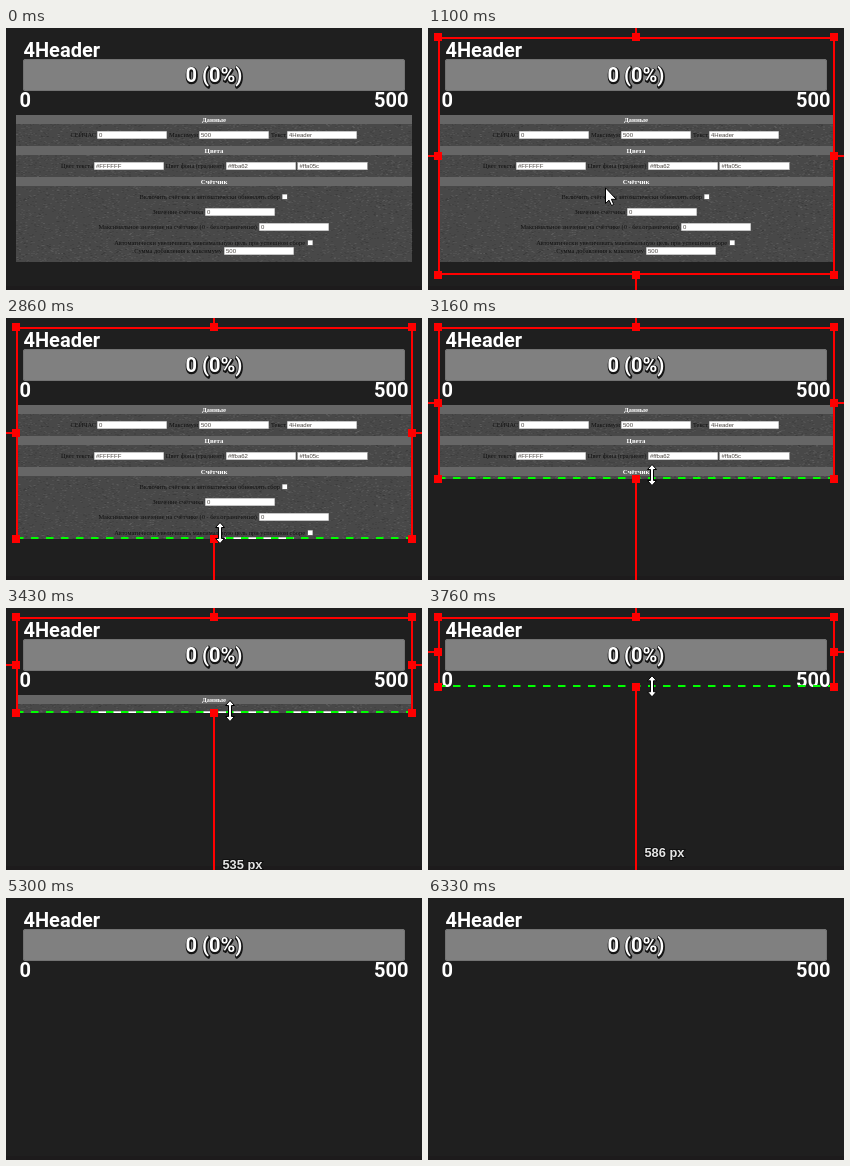
These frames come from a looping animation (416x262 px, 6590 ms). An HTML page with a canvas:

```html
<!DOCTYPE html>
<html lang="ru">
<head>
<meta charset="utf-8">
<style>
html, body { margin: 0; width: 100%; height: 100%; overflow: hidden; background: #1f1f1f; }
canvas { display: block; width: 416px; height: 262px; }
</style>
</head>
<body>
<canvas id="stage" width="416" height="262"></canvas>
<script>
const W = 416, H = 262, LOOP = 6590;
const LEFT = 10, RIGHT = 407, TOP = 9, BOTTOM = 247, MID = 208;
const BG = '#1f1f1f', RED = '#ff0000', GREEN = '#00ff00', HOVER = '#007fff';
const SERIF = '"Liberation Serif", serif';
const SANS = '"Liberation Sans", sans-serif';
const ROBOTO = 'Roboto, sans-serif';
const ctx = document.getElementById('stage').getContext('2d');

// Keys are [time, ...values]; values are interpolated linearly.
function track(keys, t) {
  if (t <= keys[0][0]) return keys[0].slice(1);
  for (let i = 1; i < keys.length; i++) {
    const a = keys[i - 1], b = keys[i];
    if (t <= b[0]) {
      const k = (t - a[0]) / (b[0] - a[0]);
      return a.slice(1).map((v, j) => v + (b[j + 1] - v) * k);
    }
  }
  return keys[keys.length - 1].slice(1);
}

const edgeKeys = [[2760, 246], [2860, 221.5], [3160, 161], [3430, 105],
  [3600, 86], [3750, 79], [4060, 83], [4200, 84]];
const enterKeys = [[200, 2, 205], [380, 62, 190], [560, 140, 167], [730, 177, 159]];
const descendKeys = [[1260, 177, 159], [1500, 192, 184], [1760, 214, 228], [1900, 218, 238]];
const hoverKeys = [[1930, 215, 248], [2260, 214, 242]];
// Horizontal place and offset from the dragged edge.
const dragKeys = [[2760, 214, -5], [2860, 214, -6], [3160, 224, -4], [3430, 224, -2], [4200, 224, 1]];
const leaveKeys = [[4670, 224, 84], [4860, 45, 115]];

function text(c, str, x, y, font, color, align = 'left') {
  c.font = font;
  c.fillStyle = color;
  c.textAlign = align;
  c.fillText(str, x, y);
}

function box(c, x, y, w, h, color) {
  c.fillStyle = color;
  c.fillRect(x, y, w, h);
}

function label(c, str, right, y) {
  text(c, str, right, y, '6.4px ' + SERIF, '#101010', 'right');
}

function input(c, x, y, value) {
  box(c, x, y, 70, 8, '#ffffff');
  c.strokeStyle = '#8a8a8a';
  c.lineWidth = 0.5;
  c.strokeRect(x + 0.25, y + 0.25, 69.5, 7.5);
  text(c, value, x + 2, y + 6, '6px ' + SANS, '#4a4540');
}

function checkbox(c, x, y) {
  box(c, x, y, 5.5, 5.5, '#777777');
  box(c, x + 0.5, y + 0.5, 4.5, 4.5, '#ffffff');
}

function drawPanel(c) {
  box(c, LEFT, 87, RIGHT - LEFT - 1, 147, '#484848');
  let seed = 7;
  const rnd = () => (seed = seed * 16807 % 2147483647) / 2147483647;
  for (let i = 0; i < 7000; i++) {
    const shade = rnd() < 0.5 ? 'rgba(0,0,0,.09)' : 'rgba(255,255,255,.05)';
    box(c, LEFT + Math.floor(rnd() * 396), 87 + Math.floor(rnd() * 147), 2, 1, shade);
  }
  [['Данные', 87], ['Цвета', 118], ['Счётчик', 149]].forEach(([name, y]) => {
    box(c, LEFT, y, RIGHT - LEFT - 1, 9, '#666666');
    text(c, name, MID, y + 7, 'bold 6.8px ' + SERIF, '#ffffff', 'center');
  });

  label(c, 'СЕЙЧАС', 90, 109);
  input(c, 91, 103, '0');
  label(c, 'Максимум', 192, 109);
  input(c, 193, 103, '500');
  label(c, 'Текст', 280, 109);
  input(c, 281, 103, '4Header');

  label(c, 'Цвет текста', 87, 140);
  input(c, 88, 134, '#FFFFFF');
  label(c, 'Цвет фона (градиент)', 218.5, 140);
  input(c, 220, 134, '#ffba62');
  input(c, 291.5, 134, '#ffa05c');

  label(c, 'Включить счётчик и автоматически обновлять сбор', 274, 171);
  checkbox(c, 276, 166);
  label(c, 'Значение счётчика', 197, 186);
  input(c, 199, 180, '0');
  label(c, 'Максимальное значение на счётчике (0 - без ограничения)', 251, 201);
  input(c, 253, 195, '0');
  label(c, 'Автоматически увеличивать максимальную цель при успешном сборе', 299, 217);
  checkbox(c, 301.5, 212);
  label(c, 'Сумма добавления к максимуму', 216, 225);
  input(c, 218, 219, '500');
}

function drawWidget(c) {
  c.beginPath();
  c.roundRect(17, 31, 382, 32, 2.5);
  c.fillStyle = '#808080';
  c.fill();
  c.beginPath();
  c.roundRect(17.5, 31.5, 381, 31, 2);
  c.strokeStyle = '#737373';
  c.lineWidth = 1;
  c.stroke();
  const big = 'bold 20px ' + ROBOTO;
  text(c, '4Header', 17.5, 29, big, '#ffffff');
  text(c, '0', 13.5, 79, big, '#ffffff');
  text(c, '500', 402.5, 79, big, '#ffffff', 'right');
  c.font = big;
  c.textAlign = 'center';
  c.lineJoin = 'round';
  c.strokeStyle = '#141414';
  c.lineWidth = 2.5;
  c.strokeText('0 (0%)', MID + 0.5, 54.5);
  text(c, '0 (0%)', MID, 54, big, '#ffffff', 'center');
}

function renderPage() {
  const layer = document.createElement('canvas');
  layer.width = W;
  layer.height = H;
  const c = layer.getContext('2d');
  drawPanel(c);
  drawWidget(c);
  return layer;
}

function frameLines(bottom, color, bottomColor) {
  box(ctx, LEFT, TOP, RIGHT - LEFT, 2, color);
  box(ctx, LEFT, TOP, 2, bottom - TOP, color);
  box(ctx, RIGHT - 2, TOP, 2, bottom - TOP, color);
  if (bottomColor) box(ctx, LEFT, bottom - 2, RIGHT - LEFT, 2, bottomColor);
}

function selection(bottom, cropped) {
  const middle = Math.round((TOP + bottom) / 2);
  frameLines(bottom, RED, cropped ? null : RED);
  if (cropped) {
    for (let x = LEFT; x < RIGHT; x += 15) {
      box(ctx, x, bottom - 2, Math.min(7.5, RIGHT - x), 2, GREEN);
    }
  }
  box(ctx, 207, 0, 2, TOP, RED);
  box(ctx, 207, bottom, 2, H - bottom, RED);
  box(ctx, 0, middle - 1, LEFT, 2, RED);
  box(ctx, RIGHT, middle - 1, W - RIGHT, 2, RED);
  [LEFT, MID, 406].forEach(x => [9, middle, bottom].forEach(y => {
    if (x !== MID || y !== middle) box(ctx, x - 4, y - 4, 8, 8, RED);
  }));

  const labelY = 251 + (bottom - 84) * 10 / 21;
  if (labelY < H + 12) {
    const size = Math.round(576 - (bottom - 84) * 41 / 21) + ' px';
    ctx.font = 'bold 12.8px ' + SANS;
    ctx.textAlign = 'left';
    ctx.strokeStyle = '#111111';
    ctx.lineWidth = 2;
    ctx.strokeText(size, 216.5, labelY);
    text(ctx, size, 216.5, labelY, ctx.font, '#e4e4e4');
  }
}

function shape(points, x, y) {
  ctx.beginPath();
  points.forEach(([px, py]) => ctx.lineTo(x + px, y + py));
  ctx.closePath();
  ctx.lineJoin = 'miter';
  ctx.lineWidth = 1;
  ctx.fillStyle = '#ffffff';
  ctx.strokeStyle = '#000000';
  ctx.fill();
  ctx.stroke();
}

function arrow([x, y]) {
  shape([[0.5, 0.8], [0.5, 16.5], [4, 13.2], [6.5, 18.5], [8.8, 17.5],
    [6.4, 12.3], [11.3, 12.3]], x, y);
}

function resizer([x, y]) {
  const half = [[0, -10.5], [4.5, -5.5], [1.5, -5.5]];
  const right = half.concat(half.slice().reverse().map(([a, b]) => [a, -b]));
  const left = right.slice().reverse().map(([a, b]) => [-a, b]);
  shape(right.concat(left), x, y);
}

function cursor(t, bottom) {
  if (t < 200) return;
  if (t < 1260) arrow(track(enterKeys, t));
  else if (t < 1930) arrow(track(descendKeys, t));
  else if (t < 2760) resizer(track(hoverKeys, t));
  else if (t < 4560) {
    const [x, offset] = track(dragKeys, t);
    resizer([x, bottom + offset]);
  } else if (t < 5300) arrow(track(leaveKeys, t));
  else if (t >= 6260 && t < 6330) arrow([5, 259]);
}

const page = renderPage();

function draw(t) {
  const dragged = t >= 2760;
  const bottom = dragged ? Math.round(track(edgeKeys, t)[0]) : BOTTOM;
  box(ctx, 0, 0, W, H, BG);
  box(ctx, 0, 258, W, 4, '#1d1b1c');
  ctx.drawImage(page, 0, 0, W, bottom, 0, 0, W, bottom);
  if (t >= 235 && t < 1100) frameLines(BOTTOM, HOVER, HOVER);
  if (t >= 1100 && t < 5300) selection(bottom, dragged);
  cursor(t, bottom);
}

function tick() {
  draw(performance.now() % LOOP);
  requestAnimationFrame(tick);
}
tick();
</script>
</body>
</html>
```
